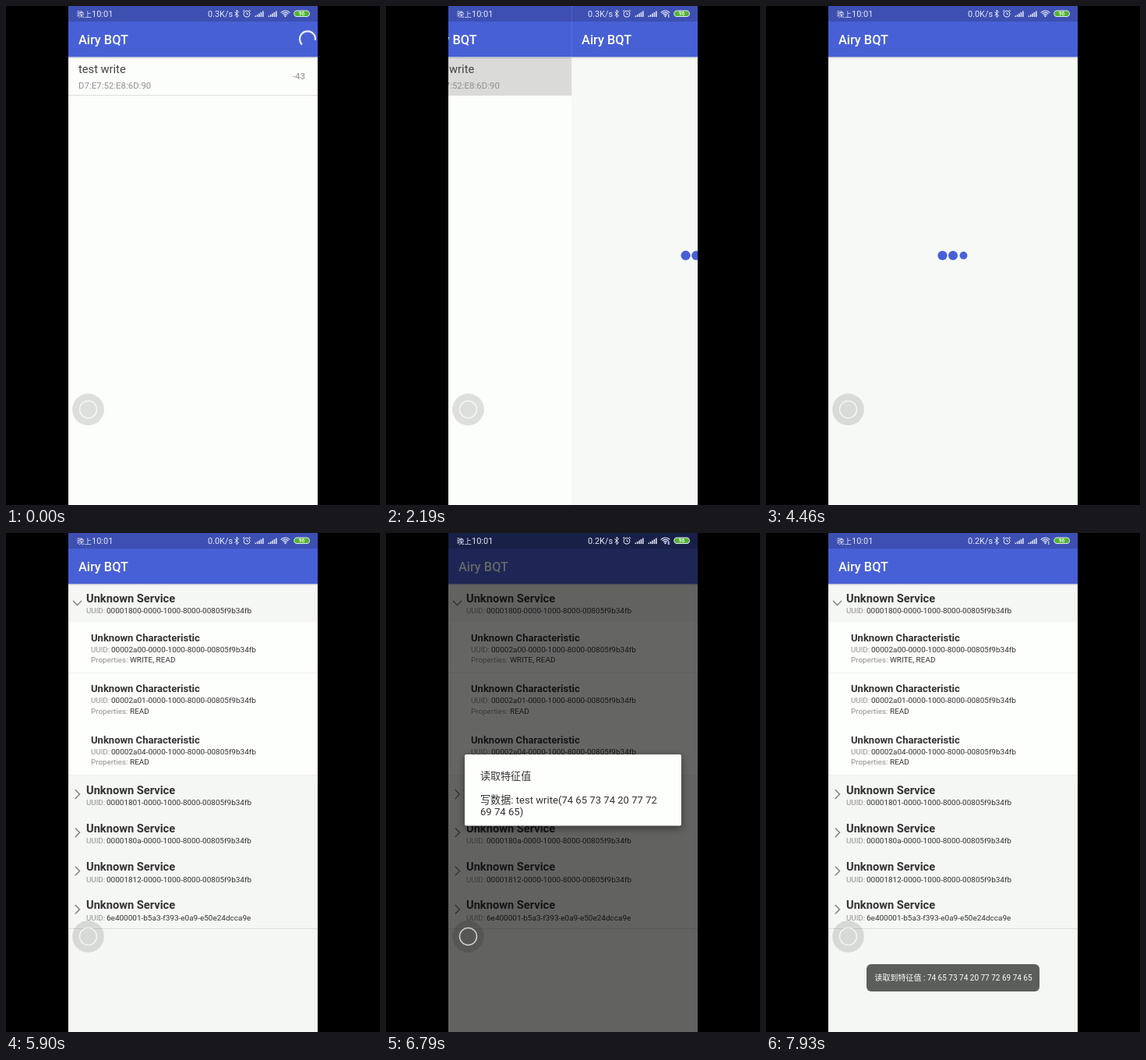
An HTML page with a canvas that plays this animation: 480x640 px, repeating every 8000 ms.

```html
<!DOCTYPE html>
<html lang="zh">
<head>
<meta charset="utf-8">
<style>
html, body { margin: 0; width: 100%; height: 100%; overflow: hidden; background: #000; }
canvas { display: block; }
</style>
</head>
<body>
<canvas id="stage" width="480" height="640"></canvas>
<script>
const c = document.getElementById('stage').getContext('2d');
const LOOP = 8000, TAU = Math.PI * 2;
const BAR = '#3d50b2', TOOLBAR = '#4860d6', WHITE = '#fdfffc', GREY = '#f5f7f4';
const ROW = 49.2, CHILD = 65.5;

const clamp = v => Math.max(0, Math.min(1, v));
const span = (t, from, to) => clamp((t - from) / (to - from));
const decelerate = x => 1 - (1 - x) * (1 - x);

// cubic-bezier(.4, 0, .2, 1)
function fastOutSlowIn(x) {
  let lo = 0, hi = 1;
  for (let i = 0; i < 16; i++) {
    const u = (lo + hi) / 2, v = 1 - u;
    if (1.2 * v * v * u + .6 * v * u * u + u * u * u < x) lo = u; else hi = u;
  }
  return lo * lo * (3 - 2 * lo);
}

function rect(x, y, w, h, color) {
  c.fillStyle = color;
  c.fillRect(x, y, w, h);
}

function roundRect(x, y, w, h, r, color) {
  c.beginPath();
  c.roundRect(x, y, w, h, r);
  c.fillStyle = color;
  c.fill();
}

function disc(x, y, r, color) {
  c.beginPath();
  c.arc(x, y, r, 0, TAU);
  c.fillStyle = color;
  c.fill();
}

function arc(x, y, r, from, to, color, width) {
  c.beginPath();
  c.arc(x, y, r, from, to);
  c.strokeStyle = color;
  c.lineWidth = width;
  c.stroke();
}

function line(points, color, width) {
  c.beginPath();
  points.forEach(([x, y]) => c.lineTo(x, y));
  c.strokeStyle = color;
  c.lineWidth = width;
  c.stroke();
}

function text(s, x, y, size, color, weight = 400, align = 'left') {
  c.font = `${weight} ${size}px Roboto, "Noto Sans CJK SC", "Noto Sans CJK", sans-serif`;
  c.textAlign = align;
  c.fillStyle = color;
  c.fillText(s, x, y);
}

function layer(alpha, draw) {
  c.save();
  c.globalAlpha *= alpha;
  draw();
  c.restore();
}

function pageFrame(background) {
  rect(80, 0, 320, 640, background);
  rect(80, 65, 320, 1, '#cfd1d4');
  rect(80, 66, 320, 1, '#e3e5e4');
  rect(80, 67, 320, 1, '#f1f3f0');
  rect(80, 0, 320, 20, BAR);
  rect(80, 20, 320, 45.25, TOOLBAR);
  text('Airy BQT', 93, 49, 16.3, '#fff', 500);
}

function spinner(t) {
  const p = ((t + 387) % 1333) / 1333;
  const start = .75 * fastOutSlowIn(clamp(2 * p - 1));
  const end = .75 * fastOutSlowIn(clamp(2 * p));
  const turn = 1.9 + TAU * (.25 * p + 2 * t / 6665);
  arc(387, 42.3, 10, turn + TAU * start, turn + TAU * end + .02, 'rgba(255,255,255,.88)', 2.2);
}

function scanPage(t) {
  pageFrame('#fcfefb');
  const press = span(t, 1780, 2005);
  if (press > 0) {
    c.save();
    c.beginPath();
    c.rect(80, 66, 320, 48.5);
    c.clip();
    rect(80, 66, 320, 49, `rgba(0,0,0,${.07 * press})`);
    disc(240, 90, 48 + 112 * decelerate(press), `rgba(0,0,0,${.07 * clamp(press * 2)})`);
    c.restore();
  }
  rect(80, 114, 320, 1, '#dcdedb');
  text('test write', 93, 86, 14.67, '#444');
  text('D7:E7:52:E8:6D:90', 93, 105.5, 11.45, '#909090');
  if (t < 1050) text('-43', 384, 94, 11.6, '#909090', 400, 'right');
  else text('-46', 384, 94, 11.6, '#000', 400, 'right');
  if (t < 1800) spinner(t);
}

function loadingDots(t) {
  for (let i = -1; i <= 1; i++) {
    const p = ((t - 3030 - 120 * i + 7500) % 750) / 750;
    const f = .5 - .5 * Math.cos(Math.PI * p);
    disc(240 + 13.5 * i, 320, 6.2 * (1 - .7 * (1 - Math.abs(2 * f - 1))), TOOLBAR);
  }
}

function field(label, value, x, valueX, y) {
  text(label, x, y, 9.8, '#909090');
  text(value, valueX, y, 9.98, '#333');
}

function service(uuid, y, open) {
  const mark = open
    ? [[86, 87], [91.5, 92.5], [97, 87]]
    : [[88.8, y + 18.6], [94.5, y + 24.4], [88.8, y + 30.2]];
  line(mark, '#7c7e7c', 1.4);
  text('Unknown Service', 103, y + 24, 14.67, '#333', 700);
  field('UUID:', uuid, 103, 129, y + 38.4);
}

function characteristic(id, properties, y) {
  text('Unknown Characteristic', 109, y + 24.7, 13.04, '#333', 700);
  field('UUID:', `0000${id}-0000-1000-8000-00805f9b34fb`, 109, 135, y + 38.7);
  field('Properties:', properties, 109, 159, y + 51.8);
}

function services(t) {
  const open = t >= 5460, childTop = 65 + ROW;
  const shift = open ? 3 * CHILD : 0;
  if (open) {
    rect(80, childTop, 320, shift, WHITE);
    characteristic('2a00', 'WRITE, READ', childTop);
    characteristic('2a01', 'READ', childTop + CHILD);
    characteristic('2a04', 'READ', childTop + 2 * CHILD);
    rect(80, 179, 320, 1, '#eef0ed');
    rect(80, 310, 320, 1, '#eceeeb');
  }
  const press = .1 * span(t, 5350, 5410) * (1 - span(t, 5460, 5560));
  rect(80, 66, 320, ROW - 1, `rgba(0,0,0,${press})`);
  ['00001800', '00001801', '0000180a', '00001812'].forEach((id, i) =>
    service(id + '-0000-1000-8000-00805f9b34fb', 65 + ROW * i + (i && shift), open && !i));
  service('6e400001-b5a3-f393-e0a9-e50e24dcca9e', 65 + ROW * 4 + shift, false);
  rect(80, Math.floor(65 + ROW * 5 + shift), 320, 1, '#dcdedb');
}

function devicePage(t) {
  pageFrame(t < 4540 ? '#f7f9f6' : GREY);
  if (t < 4540) loadingDots(t);
  else services(t);
}

function dialog(t) {
  const fadeIn = span(t, 6440, 6630), fadeOut = span(t, 7235, 7378);
  const dim = .6 * fadeIn * (1 - fadeOut);
  if (!dim) return;
  rect(80, 0, 320, 640, `rgba(0,0,0,${dim})`);
  layer(span(t, 6440, 6590) * (1 - span(t, 7235, 7345)), () => {
    const scale = .9 + .1 * decelerate(fadeIn);
    c.translate(240, 329.5);
    c.scale(scale, scale);
    c.translate(-240, -329.5);
    c.shadowColor = 'rgba(0,0,0,.45)';
    c.shadowBlur = 10;
    c.shadowOffsetY = 3;
    roundRect(101, 284, 278, 91.5, 2, WHITE);
    c.shadowColor = 'transparent';
    text('读取特征值', 121, 315.5, 13.04, '#333');
    text('写数据: test write(74 65 73 74 20 77 72', 121, 347, 13.1, '#333');
    text('69 74 65)', 121, 362.3, 13.1, '#333');
  });
}

function toast(t) {
  const alpha = decelerate(span(t, 7430, 7930));
  if (!alpha) return;
  layer(alpha, () => {
    roundRect(129, 553, 222, 35, 6, '#5b5e5b');
    text('读取到特征值 : 74 65 73 74 20 77 72 69 74 65', 139.5, 574.3, 10, '#fff', 400);
  });
}

function touchBall() {
  disc(105.5, 517.5, 20.4, 'rgba(0,0,0,.12)');
  arc(105.5, 517.5, 11, 0, TAU, 'rgba(255,255,255,.72)', 1.5);
}

function statusIcons(t) {
  const ink = '#e6e9f7';
  const speed = t < 2700 ? '0.3' : t < 6500 ? '0.0' : '0.2';
  text('晚上', 91, 13.8, 9.4, ink);
  text('10:01', 110, 14, 11, ink);
  text(speed + 'K/s', 291, 14, 10.9, ink, 400, 'right');

  line([[293.5, 7.5], [298.5, 12.3], [296, 14.6], [296, 5.2], [298.5, 7.5], [293.5, 12.3]], ink, 1);

  arc(309, 10.2, 4, 0, TAU, ink, 1);
  line([[309, 8], [309, 10.5], [311, 10.5]], ink, .9);
  line([[304, 7], [306, 5]], ink, 1);
  line([[314, 7], [312, 5]], ink, 1);

  for (const x of [319.5, 336.5])
    for (let i = 0; i < 5; i++) rect(x + i * 2.4, 12.5 - i * 1.5, 1.5, 1.5 + i * 1.5, ink);

  for (const r of [2.8, 5.2, 7.6]) arc(358.5, 13.6, r, -Math.PI * .77, -Math.PI * .23, ink, 1.2);
  disc(358.5, 13.2, 1.1, ink);
  if ((t >= 1750 && t < 3700) || t >= 6790) {
    rect(361.3, 10.5, 3, 4.5, BAR);
    line([[362.8, 10.5], [362.8, 15]], ink, 1.1);
  }

  roundRect(369.2, 5.4, 20.8, 8.6, 4.3, ink);
  roundRect(370.2, 6.4, 18.8, 6.6, 3.3, '#53b335');
  text('96', 379.6, 12.1, 6.6, '#fff', 500, 'center');
}

function render(t) {
  rect(0, 0, 480, 640, '#000');
  c.save();
  c.beginPath();
  c.rect(80, 0, 320, 640);
  c.clip();
  const slide = decelerate(span(t, 2090, 2430));
  if (slide < 1) layer(1, () => {
    c.translate(-80 * slide, 0);
    scanPage(t);
  });
  if (slide > 0) layer(1, () => {
    c.translate(320 * (1 - slide), 0);
    devicePage(t);
  });
  dialog(t);
  toast(t);
  touchBall();
  statusIcons(t);
  c.restore();
}

function tick() {
  render(performance.now() % LOOP);
  requestAnimationFrame(tick);
}
tick();
</script>
</body>
</html>
```
